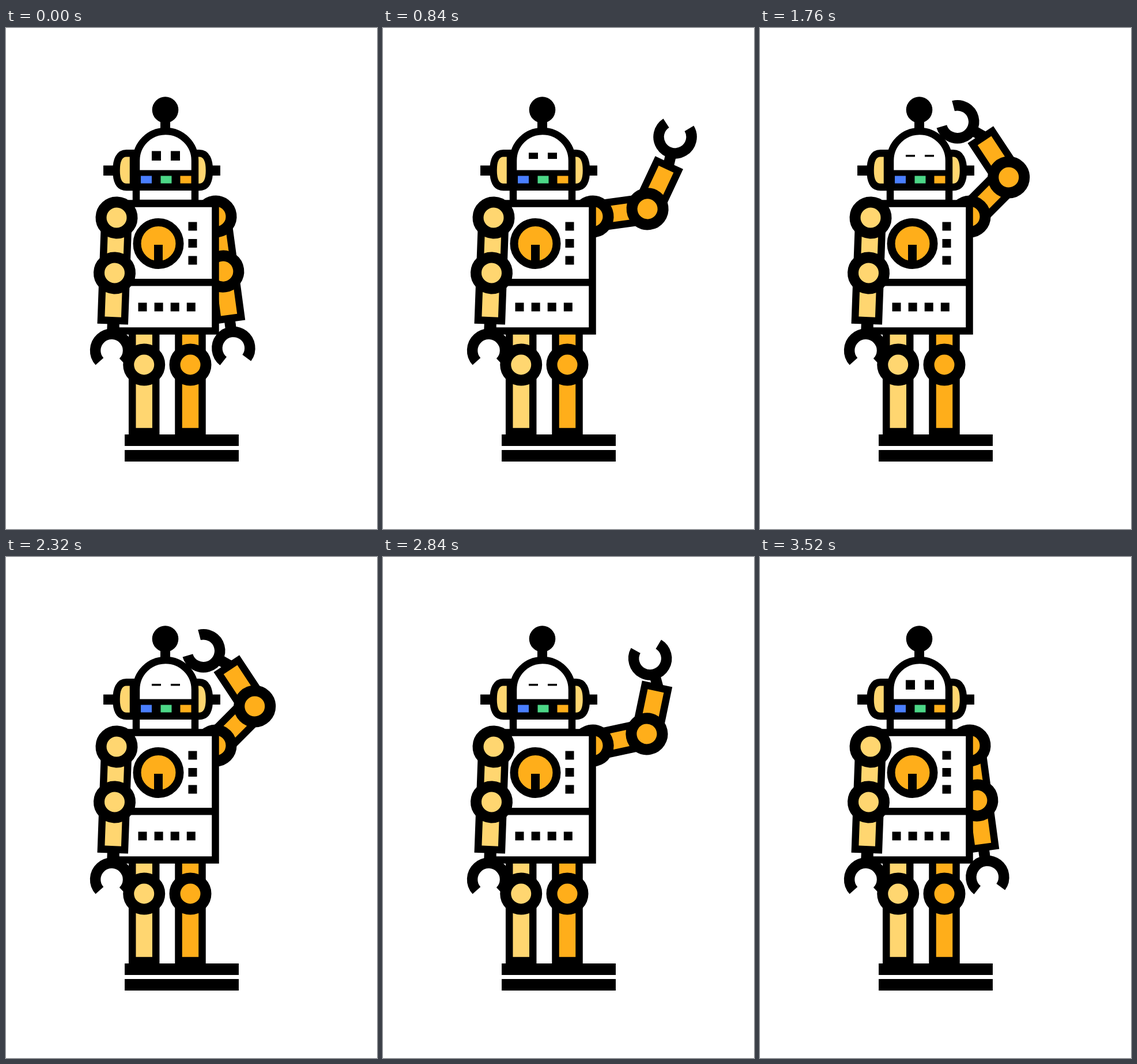
Animation, 644 px wide and 869 px high, one loop 3.56 s. Source, as an HTML page:

```html
<!DOCTYPE html>
<html lang="en">
<head>
<meta charset="utf-8">
<title>Robot salute</title>
<style>
  html, body { margin: 0; width: 100%; height: 100%; overflow: hidden; background: #fff; }
  svg { display: block; width: 644px; height: 869px; }
  .line { stroke: #000; stroke-width: 12.5; }
  .light { fill: #ffd670; }
  .deep { fill: #ffae1a; }
  .white { fill: #fff; }
</style>
</head>
<body>
<svg viewBox="0 0 644 869">
  <defs>
    <!-- limbs point along +x from their joint -->
    <rect id="upper" x="0" y="-20.5" width="96" height="41" class="line"/>
    <rect id="fore" x="0" y="-20.5" width="82.5" height="41" class="line"/>
    <circle id="joint" r="27" stroke="#000" stroke-width="19"/>
    <g id="claw">
      <rect x="-8" y="-9.5" width="34" height="19" fill="#000"/>
      <path d="M66.3 20.5A28.5 28.5 0 1 1 66.3 -20.5" fill="none" stroke="#000" stroke-width="18.5"/>
    </g>
    <g id="leg">
      <rect x="-20.5" y="500" width="41" height="200" class="line"/>
      <use href="#joint" y="584"/>
    </g>
    <path id="ear" d="M221 217.3H209C196.500 217.300 191.500 229 191.500 247S196.500 276 209 276H221Z" class="light line"/>
  </defs>

  <g id="right" class="deep"></g>

  <use href="#leg" x="239.7" class="light"/>
  <use href="#leg" x="320" class="deep"/>
  <path d="M206 705h198v20H206zM206 732h198v20H206z"/>

  <!-- head -->
  <rect x="169" y="238.5" width="203" height="17.5"/>
  <use href="#ear"/>
  <use href="#ear" transform="matrix(-1 0 0 1 544.5 0)"/>
  <circle cx="276.5" cy="142" r="22.8"/>
  <rect x="268" y="155" width="17" height="25"/>
  <path d="M226 304V230a51 51 0 0 1 102 0V304Z" class="white line"/>
  <rect x="226" y="246.5" width="102" height="35.5"/>
  <rect x="234" y="256.5" width="19" height="13" fill="#4a7fff"/>
  <rect x="268.5" y="256.5" width="19" height="13" fill="#4cd787"/>
  <rect x="302.5" y="256.5" width="19" height="13" class="deep"/>
  <rect class="eye" x="253" width="16"/>
  <rect class="eye" x="286" width="16"/>

  <!-- torso -->
  <rect x="190.5" y="304.5" width="173" height="221" class="white line"/>
  <path d="M190 441.3H364" class="line"/>
  <circle cx="264.5" cy="374" r="37" class="deep" stroke="#000" stroke-width="14"/>
  <rect x="257" y="376" width="15" height="34"/>
  <g id="dots"></g>

  <g id="left" class="light"></g>
</svg>
<script>
const LOOP = 3560, STEP = 40;
const REST = 82.3;

function buildArm(id, x, y) {
  const root = document.getElementById(id);
  root.innerHTML = `<g><use href="#upper"/>
    <g><g><use href="#claw"/></g><use href="#fore"/></g>
    <use href="#joint" x="96"/><use href="#joint"/></g>`;
  const arm = root.firstElementChild;
  const fore = arm.children[1], hand = fore.firstElementChild;
  return (shoulder, elbow, wrist) => {
    arm.setAttribute("transform", `translate(${x} ${y}) rotate(${shoulder})`);
    fore.setAttribute("transform", `translate(96 0) rotate(${elbow})`);
    hand.setAttribute("transform", `translate(88 0) rotate(${wrist})`);
  };
}

const dot = (x, y) => `<rect x="${x}" y="${y}" width="15" height="15"/>`;
document.getElementById("dots").innerHTML =
  [0, 1, 2].map(i => dot(316.5, 336.5 + 29.5 * i)).join("") +
  [0, 1, 2, 3].map(i => dot(229.5 + 28.1 * i, 476.5)).join("");

const poseRight = buildArm("right", 364, 327);
const poseLeft = buildArm("left", 192, 329);
poseLeft(92.1, 0, 0);
const eyes = document.querySelectorAll(".eye");

function ease(t, from, to) {
  const x = Math.min(1, Math.max(0, (t - from) / (to - from)));
  return x * x * (3 - 2 * x);
}
// rises over a..b, falls over c..d
const pulse = (t, a, b, c, d) => ease(t, a, b) - ease(t, c, d);

function draw(t) {
  const lift = pulse(t, 400, 1085, 2600, 3320);
  const bend = pulse(t, 400, 1070, 2680, 3320);
  const late = pulse(t, 600, 1120, 2840, 3320);
  const extra = pulse(t, 900, 1100, 1160, 1400);
  poseRight(REST - 127.4 * lift - 0.7 * extra, -78.4 * bend, -27 * late);
  const h = 16.5 - 13 * late;
  for (const eye of eyes) {
    eye.setAttribute("y", 221.7 - h / 2);
    eye.setAttribute("height", h);
  }
}

function tick() {
  const t = performance.now() % LOOP;
  draw(Math.floor(t / STEP) * STEP);
  requestAnimationFrame(tick);
}
tick();
</script>
</body>
</html>
```
